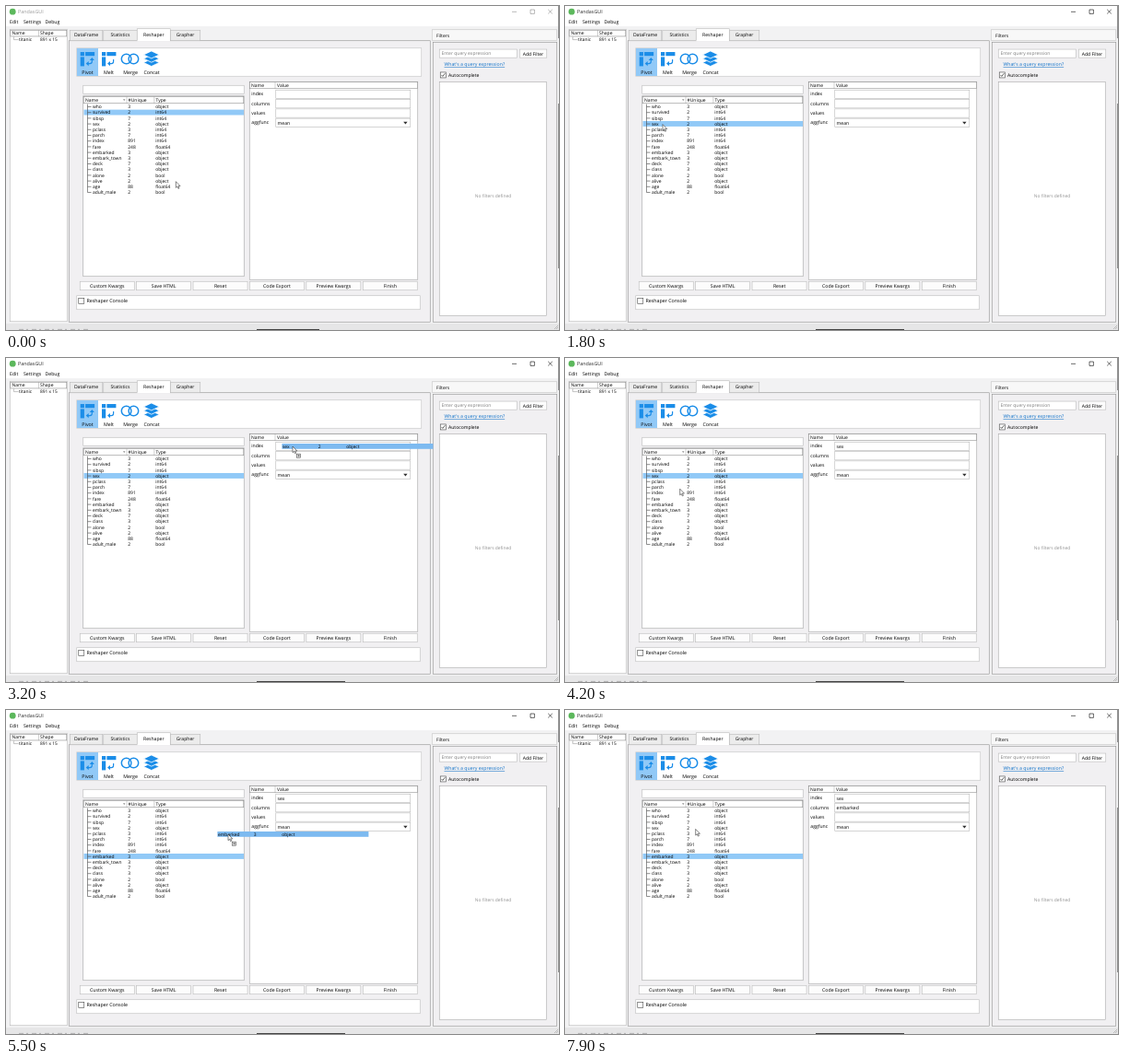
An HTML page for the animation above (8 s loop, 600x352 px).

```html
<!DOCTYPE html>
<html lang="en">
<head>
<meta charset="utf-8">
<title>Reshaper</title>
<style>
  html, body { margin: 0; width: 100%; height: 100%; overflow: hidden; background: #fff; }
  svg { display: block; width: 600px; height: 352px; }
  text { font-family: "Open Sans", "Noto Sans", sans-serif; text-rendering: geometricPrecision; white-space: pre; }
</style>
</head>
<body>
<svg id="stage" viewBox="0 0 600 352" xmlns="http://www.w3.org/2000/svg"></svg>
<script>
const stage = document.getElementById('stage');
const SELECT = '#91c9f7', ICON = '#1b8de8', INK = '#000', PANE = '#f1f0f2';

function add(tag, attrs, parent = stage) {
  const el = document.createElementNS('http://www.w3.org/2000/svg', tag);
  for (const key in attrs) el.setAttribute(key, attrs[key]);
  return parent.appendChild(el);
}
const rect = (x, y, w, h, fill, parent) => add('rect', { x, y, width: w, height: h, fill }, parent);
const box = (x, y, w, h, fill = '#fff', stroke = '#b8b8b8') =>
  add('rect', { x: x + .25, y: y + .25, width: w - .5, height: h - .5, fill, stroke, 'stroke-width': .6 });
const path = (d, stroke, width = .6, fill = 'none', parent = stage) =>
  add('path', { d, stroke, 'stroke-width': width, fill }, parent);
function label(x, y, str, size = 5.2, fill = INK, anchor = 'start', parent = stage) {
  const el = add('text', { x, y, 'font-size': size, fill, 'text-anchor': anchor }, parent);
  el.textContent = str;
  return el;
}
function button(x, y, w, h, str, size = 5.2) {
  box(x, y, w, h, '#fcfcfc', '#bcbcbc');
  label(x + w / 2, y + h / 2 + 1.9, str, size, INK, 'middle');
}
function checkbox(x, y, on) {
  box(x, y, 6.5, 6.5, '#fff', '#444');
  if (on) path(`M${x + 1.4} ${y + 3.2}l1.4 1.5 2.5-3.2`, '#222', .7);
}
function header(x, y, w, h, ...splits) {
  box(x, y, w, h, '#fff', '#8c8c8c');
  for (const s of splits) path(`M${s} ${y}v${h}`, '#a0a0a0', .5);
}

// Window chrome
rect(0, 0, 600, 352, '#fff');
rect(0, 22, 600, 323, '#f2f2f3');
add('circle', { cx: 7.2, cy: 6.2, r: 3.4, fill: '#5cb85c' });
const caption = [
  label(13, 8.4, 'PandasGUI', 5.4),
  ...['M549 6.3h5', 'M569 4h4.4v4.4h-4.4z', 'M588.2 3.8l4.6 4.6M592.8 3.8l-4.6 4.6']
    .map(d => path(d, '#000', .7))
];
[[4, 'Edit'], [19, 'Settings'], [42.5, 'Debug']].forEach(([x, s]) => label(x, 18.6, s));

// Data list
box(4, 25, 62.5, 318);
header(4.5, 26, 61.5, 7.2, 35.5);
label(6.5, 31.3, 'Name', 5);
label(37, 31.3, 'Shape', 5);
path('M8.5 33.5v3.1h5', '#888', .5);
label(14, 38.2, 'titanic', 4.9);
label(37, 38.2, '891 x 15', 4.8);

// Tabs
box(68, 37.5, 392.5, 306, PANE, '#8f8f8f');
function tab(x, w, str, active) {
  const y = active ? 24.5 : 26;
  box(x, y, w, 38 - y, active ? '#fff' : '#ececec', '#b8b8b8');
  if (active) rect(x + .5, 37, w - 1, 1.2, '#fff');
  label(x + w / 2, 33, str, 5.1, INK, 'middle');
}
tab(69, 36, 'DataFrame');
tab(105.5, 37, 'Statistics');
tab(178, 33, 'Grapher');
tab(142, 36.5, 'Reshaper', true);

// Toolbar
box(76.5, 45.5, 374.5, 31, '#fff', '#c4c4c4');
rect(77, 46, 23, 30, SELECT);
[[88.5, 'Pivot'], [111.5, 'Melt'], [135, 'Merge'], [158, 'Concat']]
  .forEach(([x, s]) => label(x, 74, s, 5.3, INK, 'middle'));
function tableIcon(x, flip) {
  const g = add('g', { transform: `translate(${x} 50)` });
  rect(0, 0, 4.2, 4.2, ICON, g);
  rect(5.4, 0, 10, 4.2, ICON, g);
  rect(0, 5.4, 4.2, 10, ICON, g);
  path('M7.8 12.6h2.4q2.4 0 2.4-2.4V8', ICON, 1.2, 'none', g);
  if (!flip) path('M10 9l2.6-3L15.2 9z', 'none', 0, ICON, g);
  path('M9 9.9L6 12.6 9 15.3z', 'none', 0, ICON, g);
}
tableIcon(80.7, false);
tableIcon(104, true);
for (const cx of [130.6, 138.4]) add('circle', { cx, cy: 57.5, r: 5.3, fill: 'none', stroke: ICON, 'stroke-width': 1.5 });
for (const y of [61.5, 57.2, 52.9])
  path(`M149.3 ${y}l8.5-4 8.5 4-8.5 4z`, '#fff', .8, ICON);

// Column tree
box(83.5, 86, 175, 9.5);
box(83.5, 97.5, 175, 196.5, '#fff', '#a4a4a4');
header(84, 98.2, 174, 7.8, 131, 160.8);
label(86, 104.3, 'Name', 5);
label(132.5, 104.3, '#Unique', 5);
label(162.5, 104.3, 'Type', 5);
path('M127 101.4h2.4l-1.2 1.4z', 'none', 0, '#555');

const PITCH = 6.2, TOP = 109.5;
const columns = `who 3 object|survived 2 int64|sibsp 7 int64|sex 2 object|pclass 3 int64|parch 7 int64|index 891 int64|fare 248 float64|embarked 3 object|embark_town 3 object|deck 7 object|class 3 object|alone 2 bool|alive 2 object|age 88 float64|adult_male 2 bool`
  .split('|').map(row => row.split(' '));
const rowY = i => TOP + i * PITCH;
const SURVIVED = 1, SEX = 3, EMBARKED = 8;

const highlight = rect(84.5, 0, 173.5, 5.9, SELECT);
columns.forEach(([name, unique, type], i) => {
  const y = rowY(i);
  path(`M88.5 ${y}h4`, '#444', .6);
  label(94, y + 1.7, name, 4.95);
  label(132.3, y + 1.7, unique, 4.95);
  label(162.3, y + 1.7, type, 4.95);
});
path(`M88.5 106.6V${rowY(15)}`, '#444', .6);

// Arguments
box(264, 82, 183, 215.5, '#fff', '#a4a4a4');
header(264.3, 82.4, 182.4, 7.6, 292);
label(266, 88.2, 'Name', 5);
label(294, 88.2, 'Value', 5);
const values = ['index', 'columns', 'values', 'aggfunc'].map((name, i) => {
  const y = 91 + i * 10.3;
  label(266.3, y + 6.4, name, 5.1);
  box(292.5, y, 146.5, 9.8, '#fff', '#b8b8b8');
  return label(294.6, y + 6.6, '', 5.1);
});
values[3].textContent = 'mean';
path('M431.2 125.8h4.4l-2.2 2.6z', 'none', 0, '#333');

['Custom Kwargs', 'Save HTML', 'Reset', 'Code Export', 'Preview Kwargs', 'Finish']
  .forEach((s, i) => button(80 + i * 61.4, 299, 59.5, 10, s));
box(76.5, 314.5, 373, 15.5, '#fff', '#bdbdbd');
checkbox(78.5, 317.2, false);
label(87.5, 322.4, 'Reshaper Console', 5.3);

// Filters
box(462, 25.5, 136, 12.2, '#f8f8f8', '#c4c4c4');
label(467, 33.6, 'Filters', 5);
box(463, 39, 135, 304.5, PANE, '#8f8f8f');
box(470, 46.8, 84.5, 9.6);
label(472.5, 53.4, 'Enter query expression', 5, '#7c7c7c');
button(557, 46.8, 30, 9.6, 'Add Filter', 5);
label(475.5, 65, "What's a query expression?", 5.2, '#0a6fc8').setAttribute('text-decoration', 'underline');
checkbox(471, 71.7, true);
label(480, 76.9, 'Autocomplete', 5.1);
box(470, 82.3, 116.5, 254.2, '#fff', '#a8a8a8');
label(528.5, 207.8, 'No filters defined', 4.9, '#909090', 'middle');

// Status bar, and the desktop showing at the window's edges
rect(0, 345, 600, 7, '#e6e6e7');
path('M595 351l4-4M597 351l2-2', '#9a9a9a', .6);
path('M14 351.4h76', '#9a9a9a', .7).setAttribute('stroke-dasharray', '5 3 2 4');
path('M599.6 0v35M599.6 106v179', '#666', .8);
const edge = rect(272, 351, 68, 1, '#444');

// Dragged row and pointer, both relative to the pointer tip
const ghost = add('g', {});
rect(-11.6, -3, 164, 5.8, '#7dbaf0', ghost);
const ghostText = [-11, 27.7, 58.3].map(x => label(x, 1.6, '', 4.95, INK, 'start', ghost));
add('rect', { x: 4.6, y: 8.2, width: 4, height: 4, fill: '#fff', stroke: '#444', 'stroke-width': .6 }, ghost);
path('M6.6 8.9v2.6M5.3 10.2h2.6', '#333', .6, 'none', ghost);
const pointer = path('M0 0v6.7l1.55-1.4 1.05 2.4 1.1-.5-1.05-2.3h2.1z', '#222', .55, '#fff');

// time, x, y of the pointer tip
const track = [
  [100, 184.3, 190.7], [400, 163, 177], [700, 126, 152], [1000, 106.5, 138.2],
  [1200, 104.5, 133], [1400, 106, 128.6], [1800, 106, 128.6],
  [2100, 133, 160], [2500, 185, 178.5], [2800, 245, 160], [3000, 285, 125],
  [3200, 311, 96], [3300, 315, 95], [3400, 311.5, 95.5], [3600, 311.5, 95.5],
  [3900, 215, 119], [4200, 124.7, 142.2], [4500, 107, 155.3], [4900, 106, 157.8], [5200, 106, 157.8],
  [5500, 241, 135], [5700, 290, 104], [5900, 304, 93.5], [6000, 304, 93.5],
  [6100, 306, 106.5], [6900, 306, 106.5], [7200, 262, 115], [7500, 186, 126], [7800, 143, 129], [7900, 141.7, 129.4]
];
function tipAt(t) {
  const i = track.findIndex(p => p[0] >= t);
  if (i < 1) return track[0].slice(1);
  const [t0, x0, y0] = track[i - 1], [t1, x1, y1] = track[i];
  const k = (t - t0) / (t1 - t0);
  return [x0 + (x1 - x0) * k, y0 + (y1 - y0) * k];
}

const LOOP = 8000, STEP = 100;
function draw(time) {
  const t = Math.floor(time % LOOP / STEP) * STEP;
  const active = t >= 1700;
  const row = !active ? SURVIVED : t < 5200 ? SEX : EMBARKED;
  const dragging = (t >= 1900 && t < 3500) || (t >= 5300 && t < 6200);
  const place = `translate(${tipAt(t).join(' ')})`;
  caption.forEach(el => el.setAttribute('opacity', active ? .85 : .4));
  highlight.setAttribute('y', rowY(row) - 3.1);
  pointer.setAttribute('transform', place);
  ghost.setAttribute('transform', place);
  ghost.setAttribute('visibility', dragging ? 'visible' : 'hidden');
  columns[row].forEach((s, i) => { ghostText[i].textContent = s; });
  values[0].textContent = t >= 3500 ? 'sex' : '';
  values[1].textContent = t >= 6200 ? 'embarked' : '';
  edge.setAttribute('width', active ? 96 : 68);
}
const start = performance.now();
function tick() {
  draw(performance.now() - start);
  requestAnimationFrame(tick);
}
tick();
</script>
</body>
</html>
```
